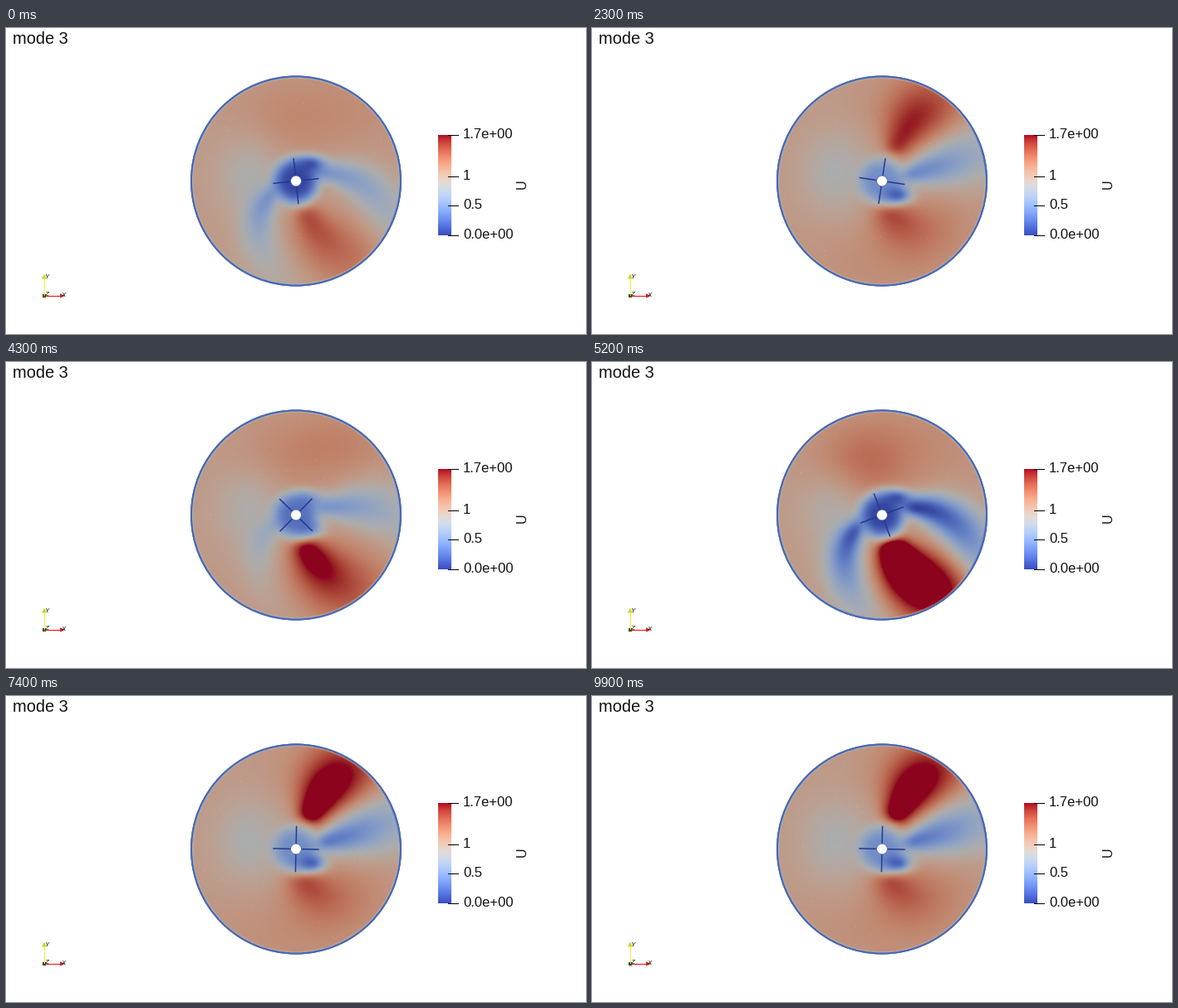
These frames come from a looping animation (698x369 px, 10 s). A matplotlib script:

```python
import numpy as np
import matplotlib.pyplot as plt
from matplotlib.animation import FuncAnimation
from matplotlib.patches import Circle, Polygon, Rectangle

W, H, DPI = 698, 369, 100
FRAMES, INTERVAL = 100, 100
CX, CY, R = 349, 184.5, 127
X0, X1, Y0, Y1 = 221, 477, 56, 313
U_MAX, SHADE = 1.7, 0.78
TURN = 7.2                      # rotor degrees per frame
PX = 72 / DPI
CMAP = plt.get_cmap("coolwarm")

# Coordinates around the hub, y down, angles in degrees
gx, gy = np.meshgrid(np.arange(X0, X1) + .5 - CX, np.arange(Y0, Y1) + .5 - CY)
radius = np.hypot(gx, gy)
theta = np.degrees(np.arctan2(gy, gx))
WALL = np.clip((R - radius) / 4, 0, 1) ** .5
MASK = np.clip(R - radius + .5, 0, 1)


def ease(t):
    t = np.clip(t, 0, 1)
    return t * t * (3 - 2 * t)


def blob(dx, dy, a, b):
    return np.exp(-((gx - dx) / a) ** 2 - ((gy - dy) / b) ** 2)


def plume(angle, bend, spread, start, reach):
    """Ray leaving the hub that turns by `bend` degrees per 100 px."""
    off = (theta - angle - bend * radius / 100 + 180) % 360 - 180
    onset = 1 / (1 + np.exp((start - radius) / 4))
    fade = np.exp(-(np.maximum(radius - start, 0) / reach) ** 2)
    return np.exp(-(off / spread) ** 2) * onset * fade


HUB = np.exp(-(radius / 28) ** 4)
UPPER_JET = plume(-72, 11, 21, 37, 95)
LOWER_JET = plume(80, -20, 24, 34, 110)
LOWER_SHEAR = plume(92, -45, 34, 30, 65)
LEFT_PLUME = plume(170, -55, 21, 28, 80)
INFLOW = blob(-55, -10, 42, 50)


def velocity(phase):
    """Speed field at a phase (0..1) of one blade passage."""
    late = (phase + .06) % 1
    low = 1 - ease((phase - .2) / .45) + ease((phase - .96) / .04)
    high = 1 - low
    up = np.clip((phase - .35) / .59, 0, 1) ** 4 * (1 - ease((phase - .95) / .05))
    down = min(late / .22, 1) * (1 - ease((late - .22) / .48))

    u = 1.06 - .22 * INFLOW
    u += 1.1 * up * UPPER_JET + 1.6 * down * LOWER_JET + .45 * high * LOWER_SHEAR
    u += .2 * high * blob(50, -85, 60, 40) + .08 * high * blob(0, 100, 100, 50)
    u += .1 * low * blob(40, -85, 95, 50) + .25 * down * blob(-25, -58, 55, 48)

    wake = plume(-12 - 16 * low, -4 + 42 * low, 19, 28, 115)
    u *= 1 - min(.5 + .25 * up + .5 * down ** 3, 1) * wake
    u *= 1 - (.55 + .4 * low) * HUB
    u *= 1 - low * (.35 + .55 * down) * LEFT_PLUME
    u *= 1 - .85 * low * blob(18, -20, 18, 11)
    u *= 1 - .75 * high * blob(19, 17, 17, 11)
    return u


def flow_image(i):
    u = velocity(round(i * TURN / 90 % 1, 6))
    rgba = CMAP(np.clip(u * WALL / U_MAX, 0, 1))
    rgba[..., :3] *= SHADE
    # Faint mesh specks in the calm region
    rng = np.random.default_rng(i)
    calm = np.argwhere((radius < 118) & (u > .95) & (u < 1.35))
    ys, xs = calm[rng.integers(0, len(calm), 50)].T
    rgba[ys, xs, :3] += rng.uniform(-.05, .12, (50, 3))
    rgba[..., 3] = MASK
    return np.clip(rgba, 0, 1)


fig = plt.figure(figsize=(W / DPI, H / DPI), dpi=DPI, facecolor="white")
ax = fig.add_axes([0, 0, 1, 1])
ax.axis("off")


def label(x, y, s, size, **kw):
    ax.text(x, y, s, fontsize=size * PX, family="Liberation Sans",
            **{"va": "baseline", "color": "#111111", **kw})


def line(xs, ys, color, width, **kw):
    return ax.plot(xs, ys, color=color, lw=width * PX, **kw)[0]


label(7.5, 18.6, "mode 3", 20)

# Colour bar
ax.imshow(np.linspace(1, 0, 256)[:, None], cmap=CMAP, extent=(520, 536, 250, 129),
          aspect="auto", interpolation="nearest")
for value, text in ((1.7, "1.7e+00"), (1, "1"), (.5, "0.5"), (0, "0.0e+00")):
    y = 249.6 - 120.8 * value / U_MAX
    line((532, 544), (y, y), "black", 1)
    label(550, y + 4.2, text, 16.6)
label(621.5, 188, "U", 16, rotation=90, ha="center", va="center")

# Orientation axes
line((46, 46), (322, 302), "#eeee30", 1)
line((46, 67), (322.7, 322.7), "#e82020", 1.2)
ax.add_patch(Polygon([(65, 320.3), (65, 325.5), (71, 322.9)], color="#c82020", lw=0))
ax.add_patch(Polygon([(43, 302.5), (49, 302.5), (46, 296.5)], color="#d8d020", lw=0))
ax.add_patch(Rectangle((44, 321), 4, 4, color="#0a5a14", lw=0))
for x, y, s in ((66.5, 323.5, "X"), (46.5, 302.5, "Y"), (46.5, 323, "Z")):
    label(x, y, s, 8, style="italic")

# Rotor
disc = ax.imshow(flow_image(0), extent=(X0, X1, Y1, Y0), aspect="auto",
                 interpolation="nearest", zorder=2)
ax.add_patch(Circle((CX, CY), R - 1, fill=False, ec="#4867b2", lw=2 * PX, zorder=3))
blades = [line([], [], "#26388c", 1.5, zorder=4) for _ in range(4)]
ax.add_patch(Circle((CX, CY), 6.4, fc="white", ec="#3850a8", lw=.6 * PX, zorder=5))
ax.set_xlim(0, W)
ax.set_ylim(H, 0)


def update(i):
    disc.set_data(flow_image(i))
    for k, blade in enumerate(blades):
        a = np.radians(6 + TURN * i + 90 * k)
        r = np.array([6, 27])
        blade.set_data(CX + r * np.cos(a), CY - r * np.sin(a))
    return [disc, *blades]


anim = FuncAnimation(fig, update, frames=FRAMES, interval=INTERVAL, repeat=True)
plt.show()
```
